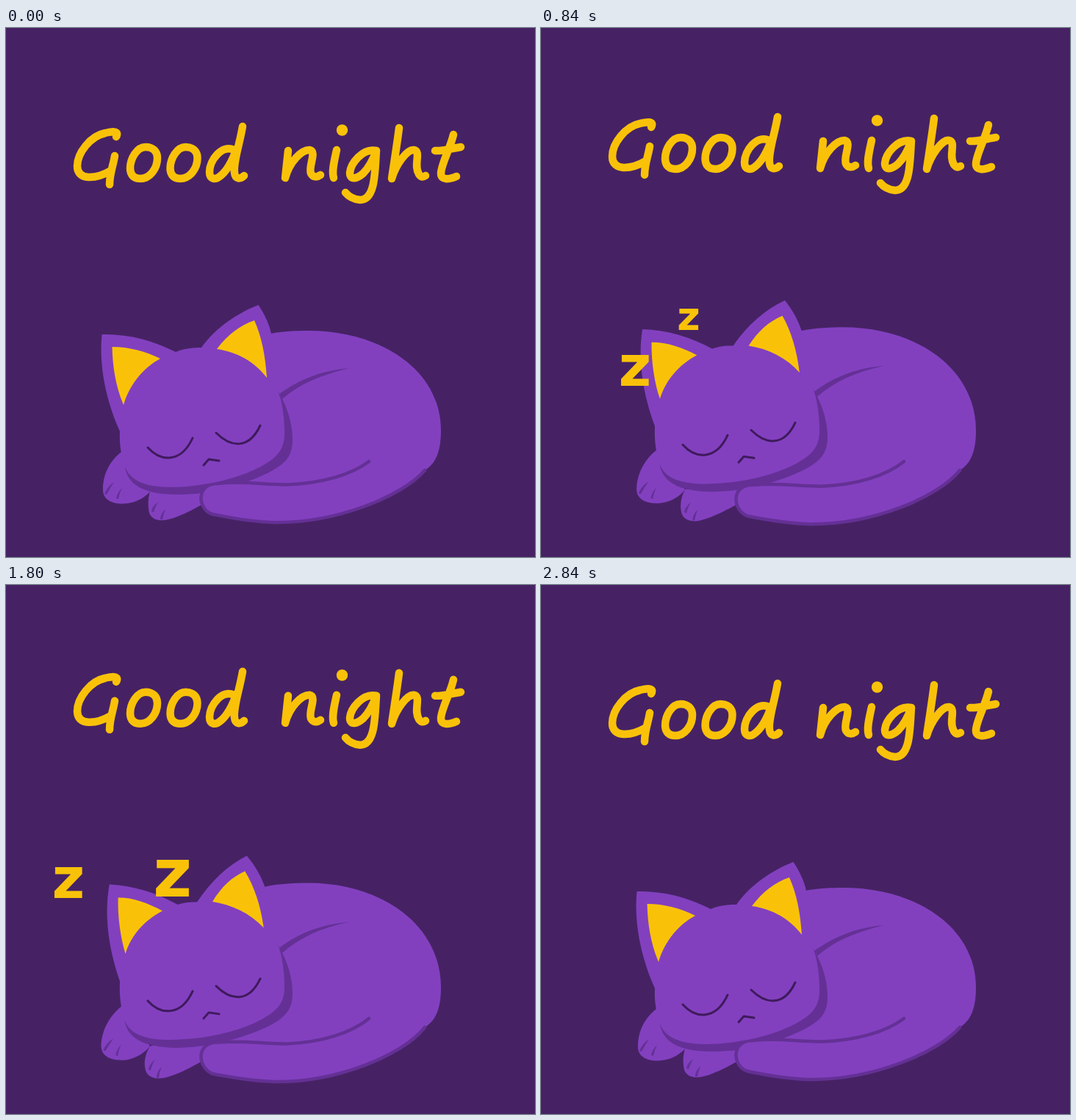
Animation, 720 px wide and 720 px high, one loop 2880 ms. Source, as an HTML page:

```html
<!DOCTYPE html>
<html lang="en">
<head>
<meta charset="utf-8">
<title>Good night</title>
<style>
  html, body { margin: 0; width: 100%; height: 100%; overflow: hidden; background: #462264; }
  svg { display: block; width: 100%; height: 100%; }
  path { fill: none; stroke-linecap: round; stroke-linejoin: round; }
  .fur { fill: #8240bf; }
  .shade { fill: #643095; }
  .gold { fill: #f9c209; }
  .outline { stroke: #643095; stroke-width: 4.5; }
  .face { stroke: #3f1a5c; stroke-width: 3; }
  #greeting path { stroke: #f9c209; stroke-width: 10.5; }
  text { fill: #f9c209; font: bold 54px "DejaVu Sans", Verdana, sans-serif; }
</style>
</head>
<body>
<svg viewBox="0 0 720 720">
  <g id="greeting" role="img" aria-label="Good night">
    <path d="M150 148C155 139 143 141 135 143C115 147 97 170 97 188C97 208 122 206 143 194M148 174C146 187 141 198 141 213"/>
    <path id="o" d="M190 162C178 162 169 178 169 191C169 201 175 205 183 205C196 205 206 191 206 177C206 168 200 162 190 162Z"/>
    <use href="#o" x="54.5"/>
    <path d="M310 166C294 158 277 180 277 196C277 206 285 207 291 202C302 194 309 178 314 164M322 134C318 158 309 183 311 197C312 206 319 206 324 201"/>
    <path d="M384 167L380 204C386 182 402 166 413 166C424 168 411 188 415 198C418 204 424 203 428 200"/>
    <path d="M450 166C447 180 443 195 446 204"/>
    <circle class="gold" cx="457.5" cy="139" r="7.7"/>
    <path d="M504 167C485 163 469 185 468 197C468 208 478 205 486 198C495 189 500 178 504 167C502 195 503 234 482 234C472 233 466 229 462 224"/>
    <path d="M535 136C532 160 528 184 525 205C531 185 546 165 555 166C566 168 554 186 562 199C565 203 568 203 571 201"/>
    <path d="M609 145C605 163 592 186 592 198C592 208 604 206 613 202M584 167C593 168 606 164 619 162"/>
  </g>
  <g id="cat"></g>
  <g id="snores"></g>
</svg>
<script>
const LOOP = 2880, BOB = 2800, STEP = 40, FADE = 130;
const svg = (tag, parent) =>
  parent.appendChild(document.createElementNS("http://www.w3.org/2000/svg", tag));
const byId = id => document.getElementById(id);

// "a~b" is a coordinate moving from a (breathed out) to b (breathed in).
const tail = "M570 602C540~541 637~640 450 674~678 365 673~676.5C330 672~675 303 666~670 282 662~666" +
  "C260 656~658 258 620~622 288 620~623C325 616~620 350 622~625 382 621.5~625C430 620~623 470 608~610 494 590";

const parts = [
  ["fur", "M300 450L340~330 416~412L360~350 416~410C378~370 412.5~405.5 396 412~404.5 411 412~404.5" +
    "C510 412~404.5 592 465~461 592 548C592 572 587 592 570 602L300 640Z"],
  ["shade", "M372 498~493C400 478~472 430 466~461 467 463~458C430 472~465 400 484~479 376 505~500Z"],
  ["fur", "M157 577~573C140 590~587 131~129 610~608 132~129 630~628C133~130 645 150 649~648 165 647~646" +
    "C180~178 645~643 190~188 638~637 197~195 630~628L190 590Z"],
  ["shade", "M134~132 634~633Q138~136 624~623 147~146 618~617Q141~140 627~626 137~135 635~634Z" +
    "M150~149 640Q151~150 633~632 158~157 626~625Q154~153 633~632 153~152 641Z"],
  ["fur", "M196 630~627C193~189 642~637 193~186 650 195~189 660C199~192 671~672 212~205 671~673 220~215 669~671" +
    "C237~235 665~666 255~252 655~656 268~267 648L280 610Z"],
  ["shade", "M198~193 658~660Q198~194 652~653 207~202 645~646Q203~198 652~653 201~196 659~661Z" +
    "M210~204 669~671Q210~204 661~663 217~211 655~656Q214~208 662~663 213~207 669~671Z"],
  ["shade", "M367 490~485C380 508~503 390 535~530 390 560~555C390 585~580 380~378 597~594 335~330 615~611" +
    "C300 628~622 270~265 635~629 232 635~629C185 635~628 165 620~615 162~161 597~591Z"],
  ["fur", tail + "Z"],
  ["outline", tail],
  ["fur", "M155 549~538C137~141 510~495 126~134 460~450 130.5~142.5 417~406C165~175 416~408 200~205 425~418 231~234 441~434" +
    "C243~245 436~431 255~250 435~431 266~259 435~431C285~278 408~402 315~300 388~380 343.5~325 377~367" +
    "C352~338 390~382 358~345 402~395 361~351 416~410L368 490~485C376 505~500 379 530~525 379 552~547" +
    "C379 572~567 370 584~578 350 595~589C326 609~603 280 624~617 225 625~618C186 625~618 168 614~609 162~161 597~591C157 582~577 154 568~562 155 549~538Z"],
  ["gold", "M144.5~154 434~424C167~176 434~424 190~194 440~432 210~213.5 450~442.5" +
    "C186~190 463~455 168~171 486~474 160~163 513~500C150~157 490~479 145~153 462~450 144.5~154 434~424Z"],
  ["gold", "M338~323 398~388C318~306 405~396 302~292 417~409 287~280 437~430" +
    "C315~306 441~434 338~332 454~446 355~350 476~465C353~346 446~436 348~336 420~408 338~323 398~388Z"],
  ["face", "M193 571~565C210 590~584 238 593~587 254 558~552M286 551~545C305 570~564 330 575~569 346 541~535"],
  ["face", "M269 595~589L276 587~581L290 589~583"]
].map(([name, shape]) => {
  const node = svg("path", byId("cat"));
  node.setAttribute("class", name);
  return { node, shape };
});

// Each key: time, left edge, baseline.
const snores = [
  { size: 54, keys: [[220, 153, 451], [320, 160, 444], [840, 187, 411], [1280, 127, 407], [1480, 106, 399]] },
  { size: 77, keys: [[640, 84, 502], [840, 108, 487], [1280, 90, 453], [1680, 80, 433], [1800, 65, 426], [2060, 35, 407]] },
  { size: 91.5, keys: [[1240, 237, 455.5], [1280, 236, 455], [1800, 203, 424], [2120, 197, 393], [2840, 169, 362]] }
].map(snore => {
  const node = svg("text", byId("snores"));
  node.textContent = "z";
  node.style.fontSize = snore.size + "px";
  return { ...snore, node };
});

const clamp = v => Math.max(0, Math.min(1, v));
const swing = p => (1 - Math.cos(2 * Math.PI * clamp(p))) / 2;

// Smooth curve through keys whose first entry is the time.
function follow(keys, t, axis) {
  const last = keys.length - 1;
  let i = 0;
  while (i < last - 1 && t >= keys[i + 1][0]) i++;
  const slope = j => {
    const a = keys[Math.max(0, j - 1)], b = keys[Math.min(last, j + 1)];
    return (b[axis] - a[axis]) / (b[0] - a[0]);
  };
  const a = keys[i], b = keys[i + 1], span = b[0] - a[0];
  const u = clamp((t - a[0]) / span), s = u * u * (3 - 2 * u);
  return a[axis] + (b[axis] - a[axis]) * s +
    span * u * (1 - u) * ((1 - u) * slope(i) - u * slope(i + 1));
}

function draw(t) {
  const breath = swing(t / LOOP);
  byId("greeting").setAttribute("transform", `translate(0 ${-20 * swing(t / BOB)})`);
  for (const { node, shape } of parts) {
    node.setAttribute("d", shape.replace(/([\d.]+)~([\d.]+)/g,
      (_, a, b) => (+a + (b - a) * breath).toFixed(2)));
  }
  for (const { node, size, keys } of snores) {
    const start = keys[0][0], end = keys[keys.length - 1][0];
    node.setAttribute("opacity", Math.min(clamp((t - start) / FADE), clamp((end - t) / FADE)));
    node.setAttribute("x", follow(keys, t, 1) - size * 0.033);
    node.setAttribute("y", follow(keys, t, 2));
  }
}

const began = performance.now();
function tick() {
  const t = (performance.now() - began) % LOOP;
  draw(Math.floor(t / STEP) * STEP);
  requestAnimationFrame(tick);
}
tick();
</script>
</body>
</html>
```
